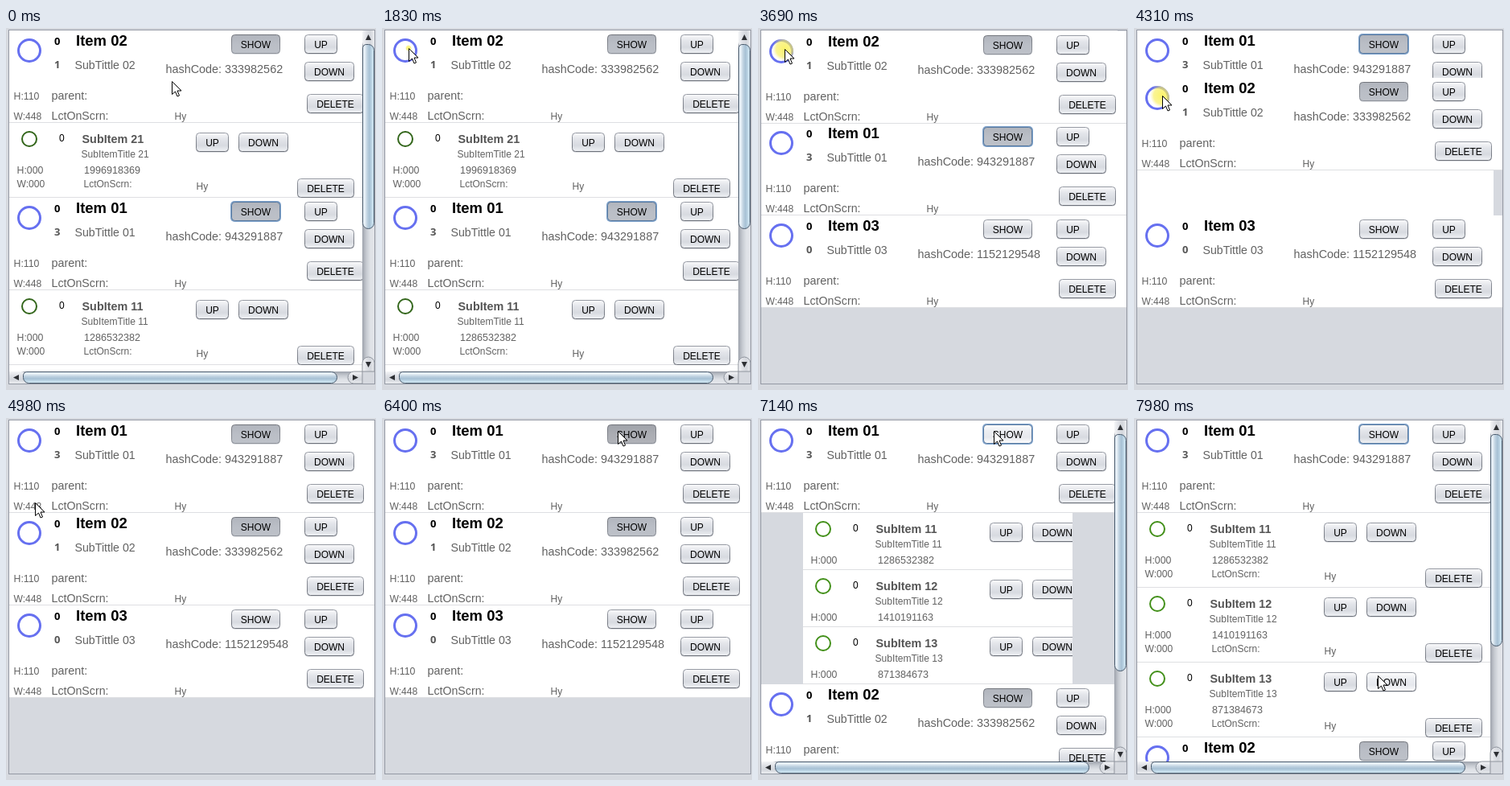
Recreate the animation shown at these times as an HTML page with a canvas. Size 460x450 px, loop 8000 ms.

```html
<!DOCTYPE html>
<html lang="en">
<head>
<meta charset="utf-8">
<title>Reorderable list</title>
<style>
  html, body { margin: 0; width: 100%; height: 100%; overflow: hidden; background: #d6d9df; }
  canvas { display: block; }
</style>
</head>
<body>
<canvas id="stage" width="460" height="450"></canvas>
<script>
const g = document.getElementById('stage').getContext('2d');
const LOOP = 8000, ITEM_H = 115, SUB_H = 93, LEFT = 4, TOP = 3;
const SANS = '"Liberation Sans", Arial, sans-serif';
const HUMAN = '"Noto Sans", sans-serif';
const BG = '#d6d9df', INK = '#626262';

const items = {
  1: { hash: 943291887, subs: [1286532382, 1410191163, 871384673] },
  2: { hash: 333982562, subs: [1996918369] },
  3: { hash: 1152129548, subs: [] }
};

const mix = (a, b, p) => a + (b - a) * p;
const smooth = p => p * p * (3 - 2 * p);

// Progress 0..1 in n visible steps, the first at time a and the last at time b.
function ramp(t, a, b, n) {
  if (t < a) return 0;
  const k = Math.floor((t - a) / ((b - a) / (n - 1)) + 0.15);
  return Math.min(n, k + 1) / n;
}

function dragTop(t) {
  if (t < 3690) return TOP;
  if (t >= 4520) return 83;
  const q = (12 * ramp(t, 3690, 4450, 12) - 1) / 11;
  return Math.round(4 + 75 * q ** 1.28);
}

function pointerAt(t) {
  const go = (a, b, p) => a.map((v, i) => Math.round(mix(v, b[i], smooth(p))));
  if (t < 130) return [206, 66];
  if (t < 1570) return go([204, 66], [32, 25], ramp(t, 730, 1500, 12));
  if (t < 3690) return [33, 25];
  if (t < 5710) {
    const y = dragTop(t);
    return [Math.round(33 + 3 * (y - TOP) / 80), y + 22];
  }
  if (t < 7210) return go([36, 105], [293, 16], ramp(t, 5710, 6400, 11));
  if (t < 7560) return go([293, 16], [293, 78], ramp(t, 7210, 7490, 5));
  return go([293, 78], [303, 320], ramp(t, 7560, 7980, 7));
}

function sceneAt(t) {
  const fold = ramp(t, 2670, 3290, 10);
  const dragging = t >= 3690 && t < 4980;
  const y = dragTop(t);
  const swapped = y - TOP >= ITEM_H / 2;
  return {
    t, dragging, dragY: y,
    order: swapped ? [1, 2, 3] : [2, 1, 3],
    open: {
      1: t < 6730 ? 1 - fold ** 2.35 : 1 - (1 - ramp(t, 6730, 7490, 11)) ** 1.83,
      2: 1 - fold ** 2.1,
      3: 0
    },
    chosen: { 1: t < 6730, 2: true, 3: false },
    focus: t < 4980 || t >= 6730,
    mouse: pointerAt(t),
    glow: t < 4980 ? ramp(t, 1830, 2600, 12) : 0,
    green: t < 2670 ? '#33661b' : '#43901a'
  };
}

function fillBox(x, y, w, h, color) {
  g.fillStyle = color;
  g.fillRect(x, y, w, h);
}

function text(s, x, y, size, color = INK, weight = '', family = SANS) {
  g.font = `${weight} ${size}px ${family}`;
  g.fillStyle = color;
  g.fillText(s, x, y);
}

function shade(x0, y0, x1, y1, colors) {
  const grad = g.createLinearGradient(x0, y0, x1, y1);
  colors.forEach((c, i) => grad.addColorStop(i / (colors.length - 1), c));
  return grad;
}

function rounded(x, y, w, h, r) {
  g.beginPath();
  g.roundRect(x, y, w, h, r);
}

function clipped(x, y, w, h, draw) {
  g.save();
  g.beginPath();
  g.rect(x, y, w, h);
  g.clip();
  draw();
  g.restore();
}

function ring(x, y, r, width, color) {
  g.beginPath();
  g.arc(x, y, r, 0, 7);
  g.lineWidth = width;
  g.strokeStyle = color;
  g.stroke();
}

function button(scene, x, y, w, label, chosen, focus) {
  const h = 24, [mx, my] = scene.mouse;
  const hover = mx >= x && mx < x + w && my >= y && my < y + h;
  const colors = chosen
    ? (hover ? ['#9fa2a9', '#abadb3', '#b0b2b8'] : ['#b0b4bc', '#babec6', '#bdc1c8'])
    : (hover ? ['#ffffff', '#eceef2', '#e6e8ed', '#ffffff'] : ['#fbfbfc', '#e3e5ea', '#d7dae0', '#f1f3f6']);
  if (focus) {
    rounded(x - 1, y - 1, w + 2, h + 2, 5);
    g.fillStyle = '#7fa3cc';
    g.fill();
  } else {
    rounded(x + 0.5, y + 1.5, w - 1, h - 1, 4);
    g.fillStyle = '#c4c7ce';
    g.fill();
  }
  rounded(x + 0.5, y + 0.5, w - 1, h - 1, 4);
  g.fillStyle = shade(0, y, 0, y + h, colors);
  g.fill();
  g.lineWidth = 1;
  g.strokeStyle = focus ? '#58799f' : shade(0, y, 0, y + h, chosen ? ['#72757c', '#8e929a'] : ['#979ba4', '#6b6f78']);
  g.stroke();
  g.textAlign = 'center';
  text(label, x + w / 2, y + 17, 12, '#000');
  g.textAlign = 'left';
}

// Yellow light around the pressed pointer, held inside the ring.
function glow(scene, x, y) {
  const [mx, my] = scene.mouse, r = mix(3, 15, scene.glow);
  const light = g.createRadialGradient(mx, my, 0, mx, my, r);
  light.addColorStop(0, 'rgba(250,240,70,.8)');
  light.addColorStop(0.7, 'rgba(248,238,90,.65)');
  light.addColorStop(1, 'rgba(248,238,120,0)');
  g.beginPath();
  g.arc(x, y, 15, 0, 7);
  g.fillStyle = light;
  g.fill();
}

function drawItem(scene, id, y, width) {
  const { hash, subs } = items[id];
  clipped(LEFT, y, width, ITEM_H, () => {
    fillBox(LEFT, y, width, ITEM_H, '#fff');
    fillBox(LEFT, y + 114, width, 1, '#dedfe2');
    ring(29, y + 25, 13.5, 3, '#6670f0');
    if (id === 2 && scene.glow) glow(scene, 29, y + 25);
    text('0', 60, y + 18, 13, '#000', 'bold', HUMAN);
    text(subs.length, 60, y + 47, 13, '#555', 'bold', HUMAN);
    text('Item 0' + id, 87, y + 19, 18.5, '#000', 'bold');
    text('SubTittle 0' + id, 85.5, y + 48, 14.2);
    text('hashCode: ' + hash, 198.5, y + 53, 14.4);
    text('H:110', 9.5, y + 86, 12.3);
    text('parent:', 56.5, y + 86, 14.4);
    text('W:448', 9.5, y + 111, 12.1);
    text('LctOnScrn:', 56.5, y + 111, 14.2);
    text('Hy', 209.5, y + 111, 12);
    button(scene, 280, y + 5, 61, 'SHOW', scene.chosen[id], id === 1 && scene.focus);
    button(scene, 371, y + 5, 41, 'UP');
    button(scene, 371, y + 39, 62, 'DOWN');
    button(scene, 374, y + 79, 71, 'DELETE');
  });
}

function drawSub(scene, id, x, y, w, h) {
  const name = `${id[0]}${id[1] + 1}`;
  clipped(x, y, w, h, () => {
    fillBox(x, y, w, h, '#fff');
    fillBox(x, y + h - 1, w, 1, '#dedfe2');
    ring(x + 25, y + 20, 9, 2, scene.green);
    text('0', x + 62, y + 23, 12, '#000');
    text('SubItem ' + name, x + 90.5, y + 25, 14.4, '#555', 'bold');
    text('SubItemTitle ' + name, x + 89.5, y + 43, 12.1);
    text('H:000', x + 9.5, y + 63, 12.3);
    text(items[id[0]].subs[id[1]], x + 93, y + 63, 12.6);
    text('W:000', x + 9.5, y + 80, 12.1);
    text('LctOnScrn:', x + 92.5, y + 80, 12);
    text('Hy', x + 232.5, y + 83, 12);
    button(scene, x + 232, y + 12, 41, 'UP');
    button(scene, x + 285, y + 12, 62, 'DOWN');
    button(scene, x + 358, y + 69, 71, 'DELETE');
  });
}

function triangle(x, dir) {
  g.beginPath();
  g.moveTo(x + 4 * dir, 7.5);
  g.lineTo(x - 3 * dir, 4);
  g.lineTo(x - 3 * dir, 11);
  g.fillStyle = '#2d2f33';
  g.fill();
}

// A scroll bar along the local x axis, 15 px thick.
function bar(len, end) {
  g.fillStyle = shade(0, 0, 0, 15, ['#9ea3ac', '#c6cad1', '#dfe2e7', '#e3e5ea']);
  g.fillRect(0, 0, len, 15);
  const cap = shade(0, 0, 0, 15, ['#f4f5f7', '#dfe1e6', '#d3d6dc', '#eceef1']);
  rounded(0, 0, 22, 15, [0, 9, 9, 0]);
  g.fillStyle = cap;
  g.fill();
  rounded(len - 18, 0, 18, 15, [9, 0, 0, 9]);
  g.fill();
  g.lineWidth = 1;
  g.strokeStyle = '#8f949d';
  g.stroke();
  rounded(17.5, 0.5, end - 18, 14, [5, 8, 8, 8]);
  g.fillStyle = shade(0, 0, 0, 15, ['#dce8f2', '#e9f1f7', '#bfd2e1', '#a6c0d4', '#c3dbea', '#d7ebf5']);
  g.fill();
  g.strokeStyle = '#48596b';
  g.stroke();
  triangle(9, -1);
  triangle(len - 9, 1);
}

function scrollBars(height) {
  g.save();
  g.translate(LEFT, 427);
  bar(439, 408);
  g.restore();
  g.save();
  g.transform(0, 1, 1, 0, 443, TOP);
  bar(424, Math.round(16 + 390 * 424 / height));
  g.restore();
}

function cursor([x, y]) {
  const shape = [[0, 0], [0, 16], [4, 12.5], [6.5, 18.5], [9, 17.5], [6.5, 11.5], [11.5, 11.5]];
  g.beginPath();
  shape.forEach(([dx, dy]) => g.lineTo(x + 0.5 + dx, y + 0.5 + dy));
  g.closePath();
  g.fillStyle = '#fff';
  g.fill();
  g.lineWidth = 1;
  g.strokeStyle = '#000';
  g.stroke();
}

function draw(t) {
  const scene = sceneAt(t);
  const rowH = id => Math.round(SUB_H * scene.open[id]);
  const total = scene.order.reduce((sum, id) => sum + ITEM_H + rowH(id) * items[id].subs.length, 0);
  const scrolls = total > 438;
  const width = scrolls ? 439 : 454, height = scrolls ? 424 : 439;

  fillBox(0, 0, 460, 450, BG);
  clipped(LEFT, TOP, width, height, () => {
    let y = TOP;
    for (const id of scene.order) {
      if (id === 2 && scene.dragging) fillBox(LEFT, y, 443, ITEM_H, '#fff');
      else drawItem(scene, id, y, width);
      y += ITEM_H;
      const h = rowH(id), w = Math.round(width * scene.open[id]);
      const x = LEFT + Math.round((width - w) / 2);
      if (h) items[id].subs.forEach((_, i) => {
        drawSub(scene, [id, i], x, y, w, h);
        y += h;
      });
    }
    if (scene.dragging) drawItem(scene, 2, scene.dragY, width);
  });
  if (scrolls) scrollBars(total);
  g.lineWidth = 1;
  g.strokeStyle = '#9499a4';
  g.strokeRect(3.5, 2.5, 455, 440);
  cursor(scene.mouse);
}

function frame() {
  draw(performance.now() % LOOP);
  requestAnimationFrame(frame);
}
frame();
</script>
</body>
</html>
```
